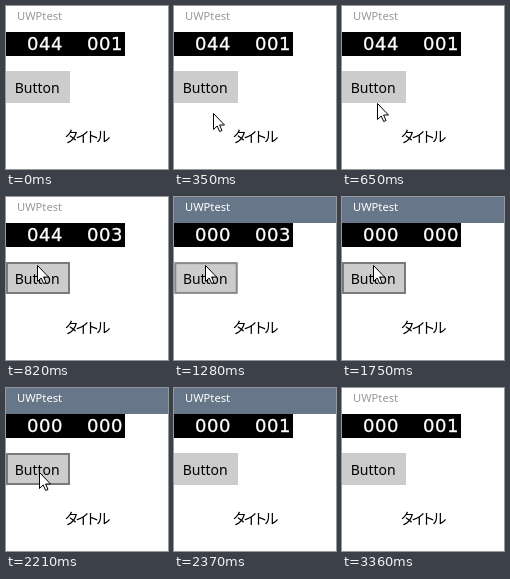
An HTML page for the animation above (3.53 s loop, 162 by 163 pixels).

```html
<!DOCTYPE html>
<html lang="ja">
<head>
<meta charset="utf-8">
<title>UWPtest</title>
<style>
  html, body { margin: 0; width: 100%; height: 100%; overflow: hidden; background: #fff; }
  svg { display: block; width: 162px; height: 163px; }
  text { font-family: "Noto Sans", "Open Sans", sans-serif; white-space: pre; }
  .kana { font-family: "Noto Sans CJK JP", "Noto Sans CJK", sans-serif; }
  .digits { font: 18px "DejaVu Sans", sans-serif; fill: #fff; stroke: #fff; stroke-width: .3; }
</style>
</head>
<body>
<svg viewBox="0 0 162 163">
  <rect width="162" height="163" fill="#fff"/>
  <rect id="bar" width="162" height="26" fill="#68768a"/>
  <text id="caption" x="11" y="14" font-size="11.2">UWPtest</text>
  <rect y="26" width="119" height="24"/>
  <text id="left" class="digits" x="21 33 45" y="44"></text>
  <text id="right" class="digits" x="81 93 105" y="44"></text>
  <g id="button">
    <rect id="face" y="65" width="64" height="32"/>
    <rect id="border" x="1" y="66" width="62" height="30" fill="none" stroke="#7a7a7a" stroke-width="2"/>
    <text x="8.7" y="87" font-size="14">Button</text>
  </g>
  <text class="kana" x="58.3 69.3 79 90" y="136.3" font-size="14.6">タイトル</text>
  <path id="cursor" d="M.5 .5V16.5L4.2 13L6.7 18.5L9 17.5L6.6 12H11.5Z" fill="#fff" stroke="#000" stroke-width="1"/>
</svg>
<script>
const LOOP = 3530;
const $ = id => document.getElementById(id);

// Each track holds [start time, value] steps.
const tracks = {
  active: [[0, false], [1280, true], [3360, false]],
  left: [[0, 44], [1280, 0]],
  right: [[0, 1], [730, 2], [820, 3], [1600, 0], [2290, 1]],
  button: [[0, "rest"], [730, "hover"], [1280, "tilt"], [1370, "pressed"],
           [1520, "tilt"], [1600, "hover"], [2290, "rest"]],
  cursor: [[0, null], [100, [76, 150]], [145, [55, 133]], [190, [42, 119]],
           [350, [39, 107]], [650, [35, 97]], [730, [32, 78]], [820, [31, 68]],
           [2210, [33, 84]], [2290, [40, 114]], [2370, null]]
};

const valueAt = (track, t) => track.findLast(([start]) => start <= t)[1];
const show = (id, on) => $(id).setAttribute("visibility", on ? "visible" : "hidden");
const pad = n => String(n).padStart(3, "0");

function draw(t) {
  const now = {};
  for (const name in tracks) now[name] = valueAt(tracks[name], t);

  show("bar", now.active);
  $("caption").setAttribute("fill", now.active ? "#fff" : "#999");
  $("caption").setAttribute("font-weight", now.active ? 500 : 400);
  $("left").textContent = pad(now.left);
  $("right").textContent = pad(now.right);

  const pressed = now.button === "pressed";
  const shrunk = pressed || now.button === "tilt";
  $("face").setAttribute("fill", pressed ? "#999" : "#ccc");
  show("border", now.button !== "rest" && !pressed);
  $("border").setAttribute("stroke", shrunk ? "#8a8a8a" : "#7a7a7a");
  $("button").setAttribute("transform",
    shrunk ? "translate(32 81) scale(.99) translate(-32 -81)" : "");

  show("cursor", now.cursor);
  if (now.cursor) $("cursor").setAttribute("transform", `translate(${now.cursor})`);
}

const begin = performance.now();
function tick() {
  draw((performance.now() - begin) % LOOP);
  requestAnimationFrame(tick);
}
tick();
</script>
</body>
</html>
```
